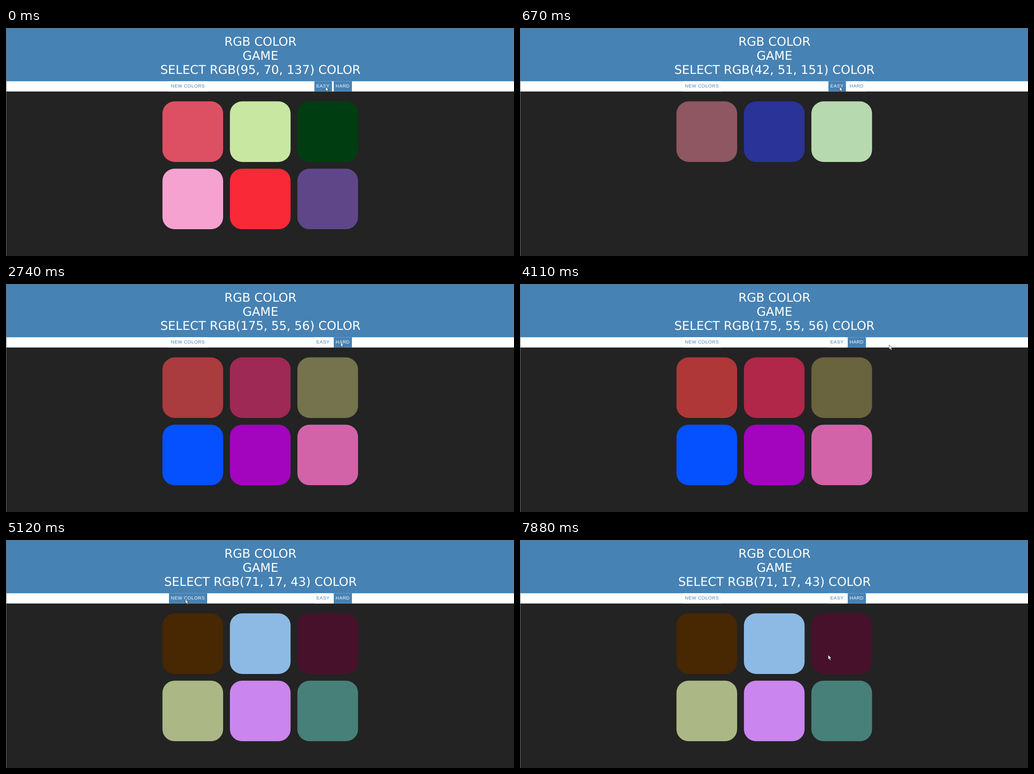
Animation, 1116 px wide and 502 px high, one loop 8 s. Source, as an HTML page:

```html
<!DOCTYPE html>
<html lang="en">
<head>
<meta charset="utf-8">
<title>RGB Color Game</title>
<style>
  html, body { margin: 0; width: 100%; height: 100%; overflow: hidden; background: #232323; }
  svg { display: block; width: 1116px; height: 502px; }
  text { text-rendering: geometricPrecision; }
  .title { font: 26.6px "DejaVu Sans", Verdana, sans-serif; fill: #fff; text-anchor: middle; }
  .label { font: 10px "Liberation Sans", Arial, sans-serif; letter-spacing: .64px; }
</style>
</head>
<body>
<svg viewBox="0 0 1116 502">
  <rect width="1116" height="502" fill="#232323"/>
  <rect width="1116" height="118" fill="#4682b4"/>
  <rect y="117.3" width="1116" height="22.5" fill="#fff"/>
  <path d="M0 .5H1116M.5 0V502" stroke="#6b7175" fill="none"/>
  <g class="title">
    <text x="559" y="38.5">RGB COLOR</text>
    <text x="559" y="69.5">GAME</text>
    <text id="goal" x="559" y="100.5"></text>
  </g>
  <g id="buttons"></g>
  <g id="squares"></g>
  <path id="cursor" d="M0 0V10.2L2.4 8L4 11.8L5.8 11L4.2 7.3H7.2Z" fill="#fff" stroke="#111" stroke-width=".7"/>
</svg>
<script>
const LOOP = 8000, BEAT = 130, SQUARE_FADE = 300, BUTTON_FADE = 200;
const SIDE = 133.3, PITCH = 148.2;
const BLUE = [70, 130, 180], WHITE = [255, 255, 255];

// at: headline and layout switch; fade: squares start blending
const rounds = [
  { at: 0, fade: 0, goal: "95, 70, 137", colors: "dd5063 c8e7a1 003e12 f5a2d1 f92938 5f4689" },
  { at: 280, fade: 343, goal: "42, 51, 151", colors: "8e5761 2a3397 b7d9af" },
  { at: 2470, fade: 2560, goal: "175, 55, 56", colors: "af3738 b12749 69633e 0550ff a304be d263a8" },
  { at: 4710, fade: 4768, goal: "71, 17, 43", colors: "482703 8dbae4 47112b abb785 ca85ef 478079" }
];
for (const r of rounds) r.colors = r.colors.split(" ").map(parseHex);

// Pointer glides: it rests where the last one ended
const home = { x: 702, y: 129 };
const glides = [
  { from: 670, to: 930, x: 700, y: 133 },
  { from: 950, to: 1700, x: 735, y: 128 },
  { from: 2860, to: 3310, x: 493, y: 147 },
  { from: 3460, to: 3900, x: 817, y: 134 },
  { from: 4000, to: 4420, x: 394, y: 130 },
  { from: 6110, to: 6260, x: 399, y: 132 },
  { from: 6400, to: 7180, x: 455, y: 233 },
  { from: 7180, to: 7820, x: 677, y: 253 }
];

// lit: how far the button is filled, from 0 to 1
const buttons = [
  { name: "NEW COLORS", x: 358, w: 84, lit: t => fade(t, 4280) - fade(t, 6560) },
  { name: "EASY", x: 677.5, w: 38.5, lit: t => 1 - fade(t, rounds[2].fade) },
  { name: "HARD", x: 720, w: 40, lit: t => 1 - fade(t, rounds[1].fade) + fade(t, 1535) }
];

function parseHex(hex) {
  return [0, 2, 4].map(i => parseInt(hex.slice(i, i + 2), 16));
}

function clamp(x) {
  return Math.min(1, Math.max(0, x));
}

function bezier(s, p1, p2) {
  return 3 * (1 - s) * (1 - s) * s * p1 + 3 * (1 - s) * s * s * p2 + s * s * s;
}

// CSS "ease"
function ease(x) {
  x = clamp(x);
  let lo = 0, hi = 1;
  for (let i = 0; i < 24; i++) {
    const mid = (lo + hi) / 2;
    if (bezier(mid, .25, .25) < x) lo = mid; else hi = mid;
  }
  return bezier(hi, .1, 1);
}

function fade(t, start) {
  return ease((t - start) / BUTTON_FADE);
}

function mix(a, b, k) {
  return `rgb(${a.map((v, i) => Math.round(v + (b[i] - v) * k))})`;
}

function roundAt(t) {
  return rounds.filter(r => r.at <= t).length - 1;
}

// The screen refreshes in beats counted from the start of each round.
function snap(t) {
  const { at } = rounds[roundAt(t)];
  return at + Math.floor((t - at) / BEAT) * BEAT;
}

function pointerAt(t) {
  let { x, y } = home;
  for (const g of glides) {
    const u = clamp((t - g.from) / (g.to - g.from));
    const k = u * u * (3 - 2 * u);
    x += (g.x - x) * k;
    y += (g.y - y) * k;
  }
  return [Math.round(x), Math.round(y)];
}

function add(parent, tag, attrs) {
  const el = document.createElementNS("http://www.w3.org/2000/svg", tag);
  for (const key in attrs) el.setAttribute(key, attrs[key]);
  return parent.appendChild(el);
}

const byId = id => document.getElementById(id);
const goal = byId("goal"), cursor = byId("cursor");

for (const b of buttons) {
  b.box = add(byId("buttons"), "rect", { x: b.x, y: 117.3, width: b.w, height: 22.5 });
  b.label = add(byId("buttons"), "text", { class: "label", x: b.x + 4.3, y: 131.3 });
  b.label.textContent = b.name;
}

const squares = Array.from({ length: 6 }, (_, i) => add(byId("squares"), "rect", {
  x: 343.7 + PITCH * (i % 3),
  y: 161.6 + PITCH * Math.floor(i / 3),
  width: SIDE, height: SIDE, rx: SIDE / 5
}));

function draw(t) {
  const n = roundAt(t);
  const now = rounds[n], before = rounds[n - 1] || now;
  const k = ease((t - now.fade) / SQUARE_FADE);

  goal.textContent = `SELECT RGB(${now.goal}) COLOR`;
  squares.forEach((el, i) => {
    const to = now.colors[i];
    el.setAttribute("fill", to ? mix(before.colors[i] || to, to, k) : "none");
  });
  for (const b of buttons) {
    const lit = b.lit(t);
    b.box.setAttribute("fill", mix(WHITE, BLUE, lit));
    b.label.setAttribute("fill", mix(BLUE, WHITE, lit));
  }
  cursor.setAttribute("transform", `translate(${pointerAt(t)})`);
}

const start = performance.now();
function frame() {
  draw(snap((performance.now() - start) % LOOP));
  requestAnimationFrame(frame);
}
frame();
</script>
</body>
</html>
```
